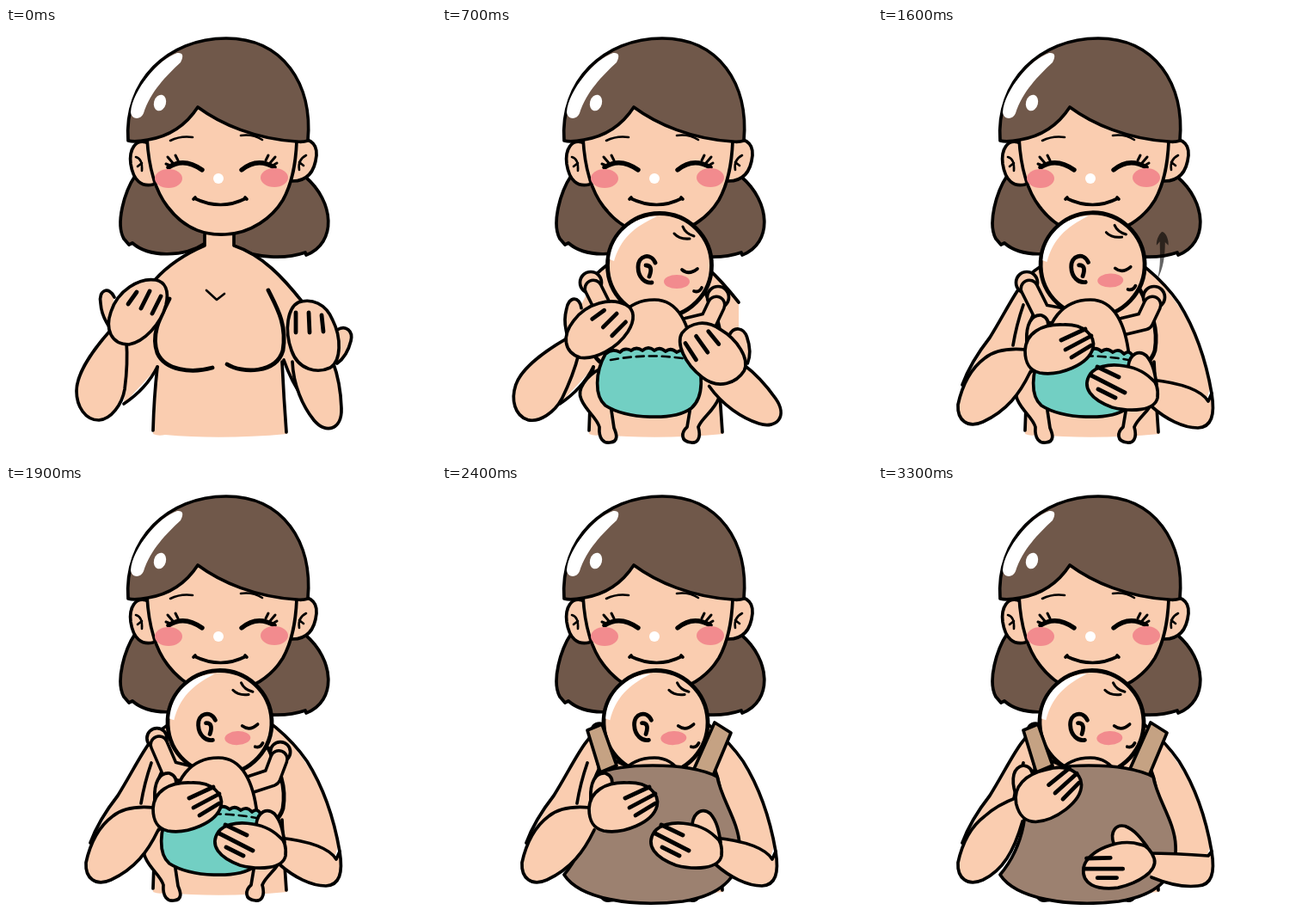
Animation, 500 px wide and 500 px high, one loop 4 s. Source, as an HTML page:

```html
<!DOCTYPE html>
<html lang="en">
<head>
<meta charset="utf-8">
<title>Skin-to-skin care</title>
<style>
  html, body { margin: 0; width: 100%; height: 100%; overflow: hidden; background: #fff; }
  svg { display: block; width: 100vw; height: 100vh; }
  path, circle { fill: none; stroke: #000; stroke-width: 3.7; stroke-linecap: round; stroke-linejoin: round; }
  .bold { stroke-width: 4.8; }
  .thin { stroke-width: 2.6; }
  .skin { fill: #facdb0; }
  .hair { fill: #70584a; }
  .blush { fill: #f28b8e; }
  .white { fill: #fff; }
  .flat { stroke: none; }
  .ink { fill: #000; stroke: none; }
  .limb { stroke-width: 23; }
  .limb.inner { stroke: #facdb0; stroke-width: 16; }
</style>
</head>
<body>
<svg viewBox="0 0 500 500">
  <path class="hair" d="M150 172C138 190 127 227 137 245L143 252L147 250C165 266 205 268 232 250L265 255C290 268 325 269 348 261L349 264C385 250 382 202 348 173Z"/>

  <!-- torso -->
  <path class="skin flat" d="M231 235V253C210 262 190 276 175 293L175 395L171 472Q177 475 185 473Q250 479 327 472L321 388L345 320C330 300 310 275 265 253V235Z"/>
  <g id="raisedBack">
    <path class="skin flat" d="M178 290L140 365L137 437L176 395ZM310 280L345 320V432L321 388Z"/>
    <path d="M137 437C155 425 168 410 176 394M323 386Q332 412 346 431M231 240V253C210 262 190 274 173 293M265 240V253C298 264 322 290 345 319"/>
  </g>
  <g id="hugBack">
    <path class="skin flat" d="M190 276C165 292 152 325 130 360L98 415L160 400L185 360ZM310 275C345 310 378 360 387 415L380 440L322 420L305 300Z"/>
    <path d="M231 240V253C215 262 200 270 188 278C165 292 152 325 130 360Q108 388 98 415M265 240V253C300 264 332 294 350 320C372 355 382 390 388 425M169 322Q161 345 157 369"/>
  </g>
  <path class="bold" d="M190 315C180 335 168 355 176 378C185 398 215 402 240 395M305 305C315 325 327 345 322 375C314 402 275 402 257 391"/>
  <path d="M176 394Q172 430 171 468M321 388Q323 430 326 470"/>
  <path class="thin" d="M233 305L245 316L254 309"/>

  <!-- mother's head -->
  <path class="skin" d="M166 134C150 127 143 142 145 158C148 178 158 185 171 182M337 133C350 125 362 133 361 148C359 168 350 178 333 178"/>
  <path class="thin" d="M151 150Q159 152 158 166M153 161L158 157M349 148Q339 153 341 165M341 156L346 160"/>
  <path class="skin" d="M164 128C166 165 174 190 188 208C210 237 235 241 255 240C285 239 310 220 322 200C334 178 337 155 338 132L223 92Z"/>
  <path class="hair" d="M142 131C137 62 188 12 256 12C322 12 357 65 351 131Q345 133 338 132C290 129 250 112 223 92C210 112 190 126 165 130Q150 133 142 131Z"/>
  <path class="white flat" d="M199 29C178 36 147 72 145 98C146 107 157 107 160 99C168 74 186 56 203 40Q209 28 199 29Z"/>
  <ellipse fill="#fff" cx="179" cy="87" rx="7" ry="9.5" transform="rotate(15 179 87)"/>
  <path class="thin" d="M191 131Q203 125 217 127M273 125Q287 123 298 130"/>
  <path d="M189 162Q207 150 228 165M274 165Q292 150 312 162" style="stroke-width:5.4"/>
  <path d="M191 160L186 158M194 157L188 150M200 154L197 148M310 160L315 157M307 157L313 150M302 154L305 148" style="stroke-width:3"/>
  <g class="blush"><ellipse cx="189" cy="175" rx="16" ry="11"/><ellipse cx="312" cy="174" rx="16" ry="11"/></g>
  <circle class="white flat" cx="247" cy="175" r="6"/>
  <path d="M219 198Q250 213 279 198M218 199L220 197M278 197L280 199"/>

  <g id="baby">
    <path class="skin" d="M184 396C168 405 156 420 162 432C168 446 180 453 183 464C182 478 188 483 195 482C206 481 203 472 200 465L196 438ZM300 394C316 404 326 420 322 430C316 446 302 453 298 464C302 478 296 483 290 482C277 481 278 470 285 464L289 440Z"/>
    <circle class="skin" id="fistL"/><circle class="skin" id="fistR"/>
    <path class="limb" id="armsOuter"/><path class="limb inner" id="armsInner"/>
    <g id="babyHead">
      <circle class="skin bold" cx="253" cy="276" r="60.5"/>
      <path class="white flat" d="M195 269C198 240 222 219 250 219C222 232 208 245 200 271Z"/>
      <path class="bold" d="M248 273C243 261 228 264 228 278C228 290 236 297 244 296M237 276Q246 276 241 289"/>
      <path d="M279 281Q287 288 297 280M293 306Q299 308 302 302"/>
      <path d="M270 239Q276 246 288 245M280 231Q283 239 293 242" style="stroke-width:3"/>
      <ellipse class="blush" cx="273" cy="295" rx="15" ry="8"/>
    </g>
    <path class="skin" d="M193 382C195 340 215 316 247 316C275 316 288 345 292 382"/>
    <path d="M190 379C178 400 177 428 190 439C215 455 270 457 290 442C306 428 302 400 296 381q-4 -7 -10 -2q-6 -7 -13 -2q-7 -6 -13 -1q-7 -6 -13 -1q-7 -6 -14 0q-7 -5 -13 0q-8 -4 -13 2q-9 -5 -17 2Z" style="fill:#72cfc3"/>
    <path class="thin" d="M196 386Q244 377 291 386" stroke-dasharray="9 6"/>
  </g>

  <g id="wrap">
    <path d="M169 284L186 277L203 325L184 333ZM317 275L336 287L315 337L293 329Z" style="fill:#c5a283"/>
    <path d="M180 335C200 326 225 325 245 325C270 325 300 328 320 338C325 365 345 390 346 418C348 450 330 475 280 483C220 490 160 480 142 452C152 440 164 420 169 395C173 370 175 350 180 335Z" style="fill:#9c8170"/>
  </g>

  <g id="raisedFront">
    <g id="raisedL">
      <path class="skin" d="M121 352C105 370 82 400 82 422C82 440 92 456 108 456C122 455 135 438 138 420Q142 390 140 364"/>
      <path class="skin" d="M126 313C120 300 107 304 110 320C111 335 116 340 119 346"/>
      <path class="skin" d="M174 293C155 290 130 305 122 330C115 350 122 368 143 368C160 365 180 345 186 322C190 305 185 295 174 293Z"/>
      <path class="bold" d="M152 307L142 321M167 306L157 326M180 312L170 332"/>
    </g>
    <g id="raisedR">
      <path class="skin" d="M333 388C334 415 345 440 358 456C372 473 391 467 390 442Q389 412 380 388"/>
      <path class="skin" d="M385 351C395 345 404 352 401 364C398 376 392 385 385 390"/>
      <path class="skin" d="M340 319C328 325 323 350 332 375C340 398 362 402 377 395C390 387 390 360 380 340C372 320 355 314 340 319Z"/>
      <path class="bold" d="M337 331V354M352 331L353 354M367 334L369 353"/>
    </g>
  </g>
  <g id="hugFront">
    <path class="skin" id="forearmL"/><path class="skin" id="forearmR"/>
    <g id="handL">
      <path class="skin" d="M173 364C172 345 178 333 190 334C198 337 199 343 197 350"/>
      <path class="skin" d="M171 375C172 355 190 344 215 345C240 344 253 358 250 372C245 392 210 405 188 401C176 398 171 390 171 375Z"/>
      <path class="bold" d="M213 363L241 350M218 374L248 358M225 383L248 369"/>
    </g>
    <g id="handR">
      <path class="skin" d="M291 393C293 378 304 374 312 381C320 390 322 402 324 414"/>
      <path class="skin" d="M318 408C300 390 260 386 247 402C236 418 248 432 272 441C295 447 322 445 325 430C326 420 324 412 318 408Z"/>
      <path class="bold" d="M255 394L280 406M248 404L287 424M256 420L276 430"/>
    </g>
  </g>

  <path id="upArrow" d="M72 392L73 279M59 298L73 277L88 298" style="stroke-width:5.5"/>
  <clipPath id="wipe"><rect id="wipeBox" x="176" y="220" width="80" height="40"/></clipPath>
  <g id="headArrow"><path class="ink" clip-path="url(#wipe)" d="M180 231C200 237 220 235 238 235L232 230C242 229 253 236 253 239C251 245 240 249 232 248L237 243C215 243 195 240 180 231Z"/></g>
</svg>
<script>
const LOOP = 4000, STEP = 100;
const el = id => document.getElementById(id);
const show = (id, on) => el(id).style.display = on ? '' : 'none';
const set = (id, attrs) => Object.entries(attrs).forEach(([k, v]) => el(id).setAttribute(k, v));
const lerp = (a, b, p) => a + (b - a) * p;
const ramp = (t, from, to) => Math.min(1, Math.max(0, (t - from) / (to - from)));
const bezier = (a, b, c, d, p) => {
  const q = 1 - p;
  return q * q * q * a + 3 * q * q * p * b + 3 * q * p * p * c + p * p * p * d;
};

// Blend two paths with the same commands
function blend(a, b, p) {
  const end = b.match(/[\d.]+/g);
  let i = 0;
  return a.replace(/[\d.]+/g, n => lerp(+n, +end[i++], p).toFixed(1));
}

const arms = ['M212 335L190 331L176 303M285 347L310 341L319 322', 'M212 335L192 326L184 294M288 345L307 332L312 304'];
const forearmL = ['M172 374Q140 371 124 384C108 396 98 415 93 438C92 456 104 466 122 458C150 445 165 425 177 400',
                  'M162 362Q138 371 124 384C108 396 98 415 93 438C92 456 104 466 122 458C145 447 158 425 168 390'];
const forearmR = ['M318 409Q372 415 384 434L388 425C392 450 388 464 372 465C355 465 335 455 318 440',
                  'M312 427Q345 427 384 430L388 425C392 450 388 464 372 465C355 467 335 462 318 455'];

function draw(time) {
  const t = Math.floor(time % LOOP / STEP) * STEP;
  const hug = t >= 800;
  show('raisedBack', !hug);
  show('raisedFront', !hug);
  show('hugBack', hug);
  show('hugFront', hug);

  // Forearms swing inwards around the elbows
  const fold = ramp(t, 600, 800);
  set('raisedL', { transform: `rotate(${37 * fold} 105 430)` });
  set('raisedR', { transform: `rotate(${-66 * fold} 370 440)` });

  // Baby and wrap drop in from above
  show('baby', t >= 200);
  set('baby', { transform: `translate(0 ${-164 * (1 - ramp(t, 200, 300))})` });
  show('wrap', t >= 2300);
  set('wrap', { transform: `translate(0 ${-54 * (1 - ramp(t, 2300, 2400))})` });
  show('upArrow', t >= 200 && t < 700);

  // Arrow wipes in, then swings away over the head
  const swing = ramp(t, 1300, 1600);
  show('headArrow', t >= 800 && t < 1700);
  set('wipeBox', { width: 80 * ramp(t, 700, 1000) });
  set('headArrow', {
    opacity: 1 - 0.4 * swing,
    transform: `translate(${bezier(216, 109, 259, 330, swing)} ${bezier(238, 209, 22, 265, swing)}) ` +
      `rotate(${-90 * swing}) scale(${1 - 0.24 * swing}) translate(-216 -238)`
  });

  const tilt = ramp(t, 1300, 1700);
  set('babyHead', { transform: `translate(${-4.5 * tilt} ${-tilt}) rotate(${-2.5 * tilt} 253 276)` });

  const tuck = ramp(t, 1800, 2200), limbs = blend(...arms, tuck), r = lerp(12.5, 9, tuck);
  set('armsOuter', { d: limbs });
  set('armsInner', { d: limbs });
  set('fistL', { cx: lerp(173, 183, tuck), cy: lerp(296, 285, tuck), r });
  set('fistR', { cx: lerp(321, 313, tuck), cy: lerp(313, 298, tuck), r });

  const pat = ramp(t, 3000, 3300);
  set('forearmL', { d: blend(...forearmL, pat) });
  set('forearmR', { d: blend(...forearmR, pat) });
  set('handL', { transform: `translate(${-12 * pat} ${-15 * pat}) rotate(${-14 * pat} 210 373)` });
  set('handR', { transform: `translate(${-6 * pat} ${24 * pat}) rotate(${-27 * pat} 283 415)` });
}

function tick() {
  draw(performance.now());
  requestAnimationFrame(tick);
}
tick();
</script>
</body>
</html>
```
